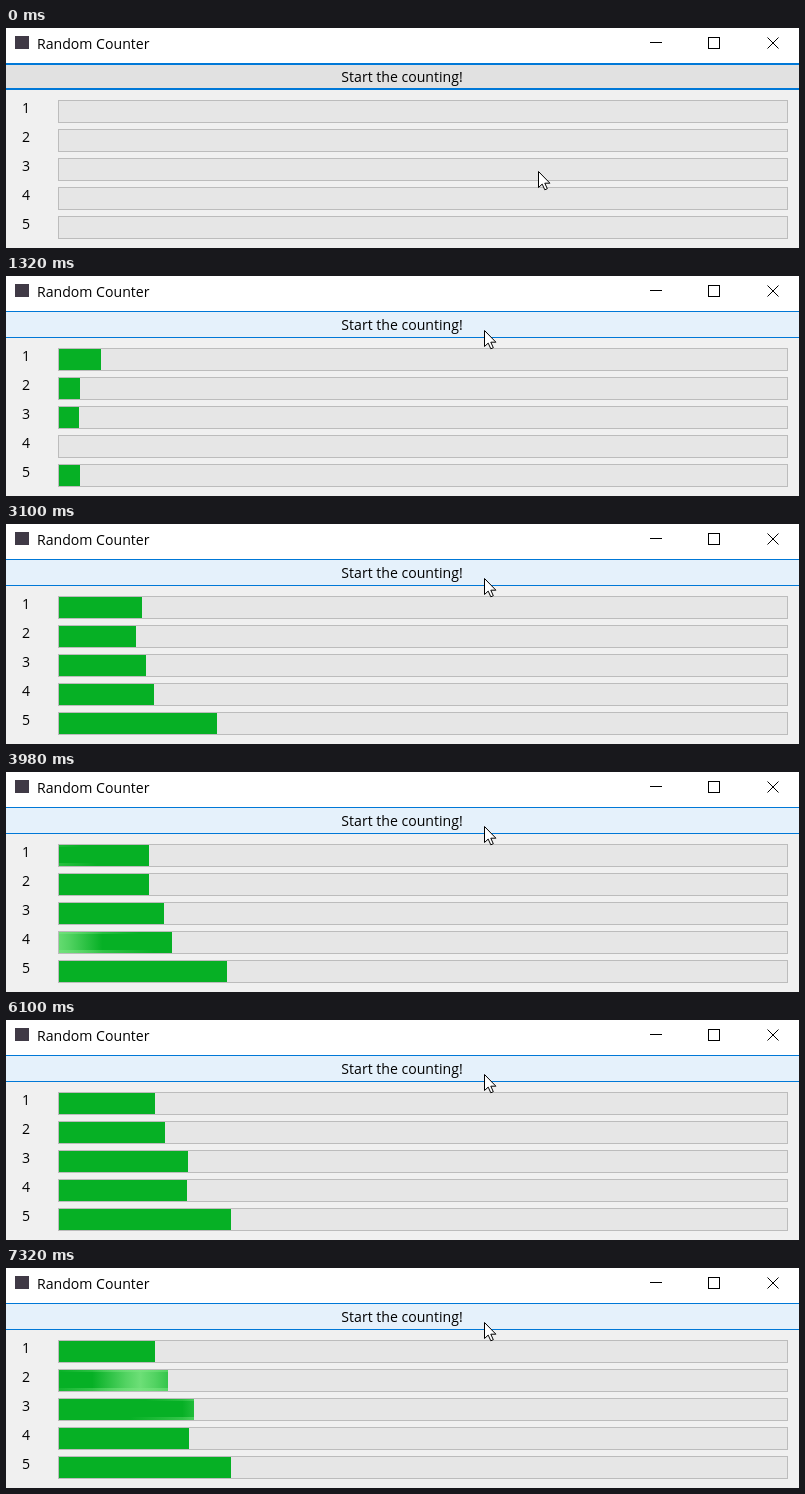
Animation, 793 px wide and 220 px high, one loop 7.4 s. Source, as an HTML page with a canvas:

```html
<!DOCTYPE html>
<html lang="en">
<head>
<meta charset="utf-8">
<title>Random Counter</title>
<style>
  html, body { margin: 0; width: 100%; height: 100%; overflow: hidden; background: #f0f0f0; }
  canvas { display: block; }
</style>
</head>
<body>
<canvas id="stage" width="793" height="220"></canvas>
<script>
const ctx = document.getElementById('stage').getContext('2d');
const LOOP = 7400, STEP = 81, MOVE_AT = 170, COUNT_AT = 1160;
const FONT = '14.1px "Open Sans", "Noto Sans", sans-serif';
const LEFT = 53, BAR_H = 21;
const SWEEP_SPEED = 0.3;

// Each bar jumps to `base`, then closes in on `base + gain`;
// `sweeps` are the times a highlight enters at its left edge.
const BARS = [
  { base: 39, gain: 59, tau: 1300, sweeps: [4120] },
  { base: 18, gain: 96, tau: 1900, sweeps: [7045] },
  { base: 17, gain: 128, tau: 2300, sweeps: [6745] },
  { base: 0, gain: 132, tau: 1300, delay: 160, sweeps: [3930, 5030] },
  { base: 4, gain: 169, tau: 740, sweeps: [] }
];

const mix = (a, b, p) => a + (b - a) * p;
const smooth = p => p * p * (3 - 2 * p);

function stepTime(t) {
  if (t < MOVE_AT) return 0;
  const from = t < COUNT_AT ? MOVE_AT : COUNT_AT;
  return from + Math.floor((t - from) / STEP) * STEP;
}

function barWidth({ base, gain, tau, delay = 0 }, t) {
  const age = t - COUNT_AT - delay;
  return age < 0 ? 0 : Math.round(base + gain * (1 - Math.exp(-age / tau)));
}

function rect(color, x, y, w, h) {
  ctx.fillStyle = color;
  ctx.fillRect(x, y, w, h);
}

function text(str, x, y, align = 'left') {
  ctx.font = FONT;
  ctx.textAlign = align;
  ctx.fillStyle = '#000';
  ctx.fillText(str, x, y);
}

function line(x0, y0, x1, y1) {
  ctx.beginPath();
  ctx.moveTo(x0, y0);
  ctx.lineTo(x1, y1);
  ctx.stroke();
}

function drawTitleBar() {
  rect('#fff', 0, 0, 793, 35);
  rect('#403a46', 9, 8, 14, 13);
  text('Random Counter', 31, 21);
  ctx.strokeStyle = '#000';
  ctx.lineWidth = 1;
  line(644, 14.5, 656, 14.5);
  ctx.strokeRect(702.5, 9.5, 11, 11);
  line(761.5, 9.5, 772.5, 20.5);
  line(772.5, 9.5, 761.5, 20.5);
}

function drawButton(state) {
  const [edge, face, width] = {
    focus: ['#0078d7', '#e1e1e1', 2],
    hover: ['#0078d7', '#e5f1fb', 1],
    press: ['#005499', '#cce4f7', 1]
  }[state];
  rect(edge, 0, 35, 793, 27);
  rect(face, 0, 35 + width, 793, 27 - 2 * width);
  text('Start the counting!', 396, 54, 'center');
}

// A soft band of light, clear at both ends
function shine(x, radius, alpha, y, width, h) {
  const g = ctx.createLinearGradient(x - radius, 0, x + radius, 0);
  g.addColorStop(0, 'rgba(120,228,128,0)');
  g.addColorStop(0.35, `rgba(120,228,128,${alpha * 0.75})`);
  g.addColorStop(0.5, `rgba(120,228,128,${alpha})`);
  g.addColorStop(0.65, `rgba(120,228,128,${alpha * 0.75})`);
  g.addColorStop(1, 'rgba(120,228,128,0)');
  rect(g, LEFT, y, width, h);
}

// The light reaches further along the top and bottom edges
function drawSweep(x, y, width) {
  shine(x, 48, 0.9, y, width, BAR_H);
  shine(x, 85, 0.6, y, width, 2);
  shine(x, 100, 0.7, y + BAR_H - 3, width, 3);
}

function drawBar(bar, i, t) {
  const y = 72 + i * 29;
  const width = barWidth(bar, t) - 1;
  text(String(i + 1), 20, y + 13, 'center');
  rect('#bcbcbc', 52, y, 730, 23);
  rect('#e6e6e6', LEFT, y + 1, 728, BAR_H);
  if (width <= 0) return;
  rect('#06b025', LEFT, y + 1, width, BAR_H);
  for (const at of bar.sweeps) drawSweep(LEFT + (t - at) * SWEEP_SPEED, y + 1, width);
}

function drawCursor(x, y) {
  ctx.save();
  ctx.translate(x + 0.5, y + 0.5);
  const arrow = new Path2D('M0 0V16L3.7 12.6L6.3 18.3L8.8 17.2L6.3 11.7H11.4Z');
  ctx.fillStyle = '#fff';
  ctx.fill(arrow);
  ctx.strokeStyle = '#000';
  ctx.lineWidth = 1;
  ctx.stroke(arrow);
  ctx.restore();
}

function draw(time) {
  const t = stepTime(time);
  const p = smooth(Math.min(1, Math.max(0, (t - 90) / 560)));
  const x = Math.round(mix(532, 478, p));
  const y = Math.round(mix(143, 54, p));
  const pressed = t > 720 && t < 890;

  rect('#f0f0f0', 0, 0, 793, 220);
  drawTitleBar();
  drawButton(pressed ? 'press' : y < 62 ? 'hover' : 'focus');
  BARS.forEach((bar, i) => drawBar(bar, i, t));
  drawCursor(x, y);
}

const start = performance.now();
function frame() {
  draw((performance.now() - start) % LOOP);
  requestAnimationFrame(frame);
}
frame();
</script>
</body>
</html>
```
